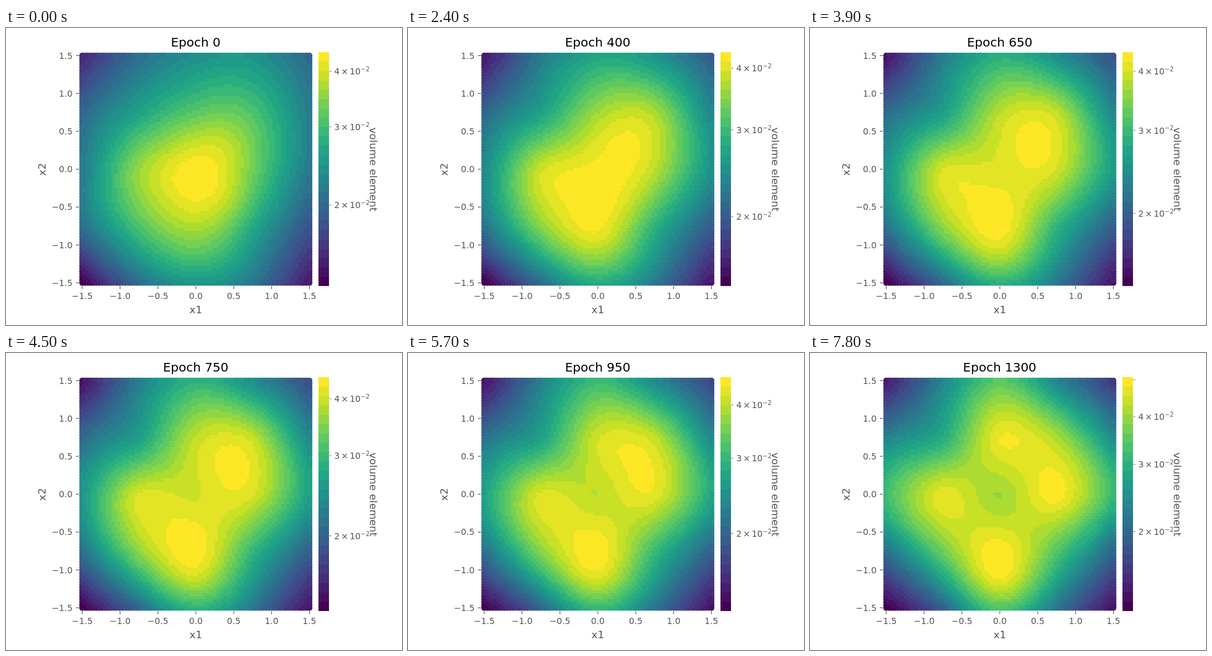
Animation, 640 px wide and 480 px high, one loop 8 s. Source, as an HTML page with a canvas:

```html
<!DOCTYPE html>
<html lang="en">
<head>
<meta charset="utf-8">
<title>Volume element</title>
<style>
  html, body { margin: 0; width: 100%; height: 100%; overflow: hidden; background: #fff; }
  canvas, svg { position: absolute; left: 0; top: 0; width: 640px; height: 480px; }
  text { font-family: "DejaVu Sans", sans-serif; font-size: 13.89px; fill: #555; }
  .label { font-size: 16.67px; }
  .sup { font-size: 9.72px; }
  #title { font-size: 20px; fill: #000; }
  .mid { text-anchor: middle; }
  .end { text-anchor: end; }
  line { stroke: #555; stroke-width: 1.11; }
  .minor { stroke-width: 0.83; }
</style>
</head>
<body>
<canvas id="field" width="640" height="480"></canvas>
<svg id="chart" viewBox="0 0 640 480">
  <text id="title" class="mid" x="306.6" y="30"></text>
  <text class="label mid" x="306.8" y="461">x1</text>
  <text class="label mid" transform="translate(64 228.4) rotate(-90)">x2</text>
  <text class="label mid" transform="translate(588 228.6) rotate(90)">volume element</text>
</svg>
<script>
const LOOP = 8000, STEP = 300, EPOCHS = 50, LAST = 1300;
const BANDS = 25, GRID = 80, DOT = 4.86;
const BAR = { x: 505, y: 39.3, w: 17.3, h: 377.8 };
const px = x => 306.8 + 122.4 * x;
const py = y => 228.2 - 122.4 * y;

// Control sites: inner 3x3, four diagonals, one low point, then the rim
const inner = [], rim = [];
for (let j = -2; j <= 2; j++) {
  for (let i = -2; i <= 2; i++) {
    const onRim = Math.max(Math.abs(i), Math.abs(j)) === 2;
    (onRim ? rim : inner).push([i * 0.75, j * 0.75]);
  }
}
const diagonals = [-0.4, 0.4].flatMap(y => [-0.4, 0.4].map(x => [x, y]));
const sites = [...inner, ...diagonals, [0, -1.1], ...rim];

// Surface heights in percent at the first and last epoch, and the midway swell
const innerFrom = [68, 84, 59, 81, 97.5, 76, 56, 72, 70, 88, 87.5, 79, 86.5, 71];
const innerTo = [74, 98, 71, 93.5, 82.5, 97, 60, 94.5, 86, 90, 87.5, 83.5, 92.5, 95];
const innerSwell = [7, 5, -2.5, 2, 0, 2, -4, 1.5, 9, 4, 0, -2, 5, 3];
const rimFrom = [0, 34, 50, 39, 8, 35, 26, 40, 40, 33, 42, 13, 36, 48, 50, 34];
const rimTo = [0, 30, 69, 39, 6, 36, 33, 66, 65, 44, 48, 10, 44, 72, 46, 18];
const rimSwell = rim.map(([x, y]) => x < -1 && y > -0.5 ? -5 : 0);

// Colour bar positions of 4e-2 and 2e-2
const tickEpochs = [0, 200, 400, 550, 750, 950, LAST];
const tick4 = [70, 66, 65, 66, 74, 84, 103];
const tick2 = [286, 293, 305, 303.5, 295.5, 291.5, 288.5];

const viridis = ["#440154", "#482475", "#414487", "#355f8d", "#2a788e", "#21918c",
  "#22a884", "#44bf70", "#7ad151", "#bddf26", "#fde725"]
  .map(h => [1, 3, 5].map(i => parseInt(h.slice(i, i + 2), 16)));

const colors = Array.from({ length: BANDS }, (_, i) => {
  const p = i / (BANDS - 1) * 10, k = Math.min(9, Math.floor(p));
  const mix = viridis[k].map((c, n) => Math.round(c + (viridis[k + 1][n] - c) * (p - k)));
  return `rgb(${mix})`;
});

function lerpAt(keys, values, v) {
  let k = 0;
  while (k < keys.length - 2 && v >= keys[k + 1]) k++;
  const f = (v - keys[k]) / (keys[k + 1] - keys[k]);
  return values[k] + (values[k + 1] - values[k]) * f;
}

function solve(a, b) {
  const n = b.length, m = a.map((row, i) => [...row, b[i]]);
  for (let c = 0; c < n; c++) {
    let p = c;
    for (let r = c + 1; r < n; r++) if (Math.abs(m[r][c]) > Math.abs(m[p][c])) p = r;
    [m[c], m[p]] = [m[p], m[c]];
    for (let r = 0; r < n; r++) {
      if (r === c) continue;
      const f = m[r][c] / m[c][c];
      for (let k = c; k <= n; k++) m[r][k] -= f * m[c][k];
    }
  }
  return m.map((row, i) => row[n] / row[i]);
}

// Thin-plate spline basis: one bump per site plus a plane
function basis(x, y) {
  const bumps = sites.map(([a, b]) => {
    const d = (x - a) ** 2 + (y - b) ** 2;
    return d ? d * Math.log(d) : 0;
  });
  return [...bumps, 1, x, y];
}

const zeros = [0, 0, 0];
const matrix = sites.map(([x, y]) => basis(x, y));
for (const f of [() => 1, s => s[0], s => s[1]]) matrix.push([...sites.map(f), ...zeros]);
const weights = [[innerFrom, rimFrom], [innerTo, rimTo], [innerSwell, rimSwell]]
  .map(parts => solve(matrix, [...parts.flat(), ...zeros]));

const dots = [];
for (let j = 0; j < GRID; j++) {
  for (let i = 0; i < GRID; i++) {
    const x = -1.5 + 3 * i / (GRID - 1), y = -1.5 + 3 * j / (GRID - 1);
    const row = basis(x, y);
    const [from, to, swell] = weights.map(w => w.reduce((sum, c, n) => sum + c * row[n], 0));
    dots.push({ x: px(x), y: py(y), from, to, swell });
  }
}

const chart = document.getElementById("chart");
const title = document.getElementById("title");
const ctx = document.getElementById("field").getContext("2d");

function add(tag, attrs, text = "", parent = chart) {
  const el = document.createElementNS("http://www.w3.org/2000/svg", tag);
  for (const k in attrs) el.setAttribute(k, attrs[k]);
  el.textContent = text;
  return parent.appendChild(el);
}

for (let i = -3; i <= 3; i++) {
  const v = i / 2, s = v.toFixed(1).replace("-", "\u2212");
  const x = px(v), y = py(v);
  add("line", { x1: x, x2: x, y1: 417.2, y2: 422 });
  add("text", { x, y: 438, class: "mid" }, s);
  add("line", { x1: 113, x2: 117.8, y1: y, y2: y });
  add("text", { x: 107.6, y: y + 5, class: "end" }, s);
}

const bandH = BAR.h / BANDS;
colors.forEach((fill, i) => add("rect", {
  x: BAR.x, y: BAR.y + BAR.h - (i + 1) * bandH, width: BAR.w, height: bandH,
  fill, "shape-rendering": "crispEdges"
}));

const ticks = [2, 3, 4, 5].map(n => {
  const g = add("g", {});
  add("line", { x1: 522.5, x2: 525.8, y1: 0, y2: 0, class: "minor" }, "", g);
  if (n < 5) {
    add("text", { x: 530.5, y: 5.3 }, n, g);
    add("text", { x: 541.6, y: 5.3 }, "\u00d7", g);
    add("text", { x: 555.5, y: 5.3 }, "10", g);
    add("text", { x: 573.3, y: 0, class: "sup" }, "\u22122", g);
  }
  return { n, g };
});

function drawField(epoch) {
  const u = epoch / LAST, arch = 4 * u * (1 - u);
  const z = dots.map(d => d.from + (d.to - d.from) * u + d.swell * arch);
  const low = Math.min(...z), span = Math.max(...z) - low;
  ctx.clearRect(0, 0, 640, 480);
  dots.forEach((d, i) => {
    const band = Math.min(BANDS - 1, Math.floor((z[i] - low) / span * BANDS));
    ctx.fillStyle = colors[band];
    ctx.beginPath();
    ctx.arc(d.x, d.y, DOT, 0, 2 * Math.PI);
    ctx.fill();
  });
}

function drawTicks(epoch) {
  const y4 = lerpAt(tickEpochs, tick4, epoch);
  const y2 = lerpAt(tickEpochs, tick2, epoch);
  for (const { n, g } of ticks) {
    const y = y4 + (y2 - y4) * Math.log2(4 / n);
    g.setAttribute("transform", `translate(0 ${y.toFixed(2)})`);
    g.setAttribute("visibility", y < BAR.y ? "hidden" : "visible");
  }
}

let shown = -1;
const start = performance.now();

function frame() {
  const t = Math.max(0, performance.now() - start) % LOOP;
  const step = Math.floor(t / STEP);
  if (step !== shown) {
    shown = step;
    const epoch = step * EPOCHS;
    title.textContent = `Epoch ${epoch}`;
    drawField(epoch);
    drawTicks(epoch);
  }
  requestAnimationFrame(frame);
}
frame();
</script>
</body>
</html>
```
